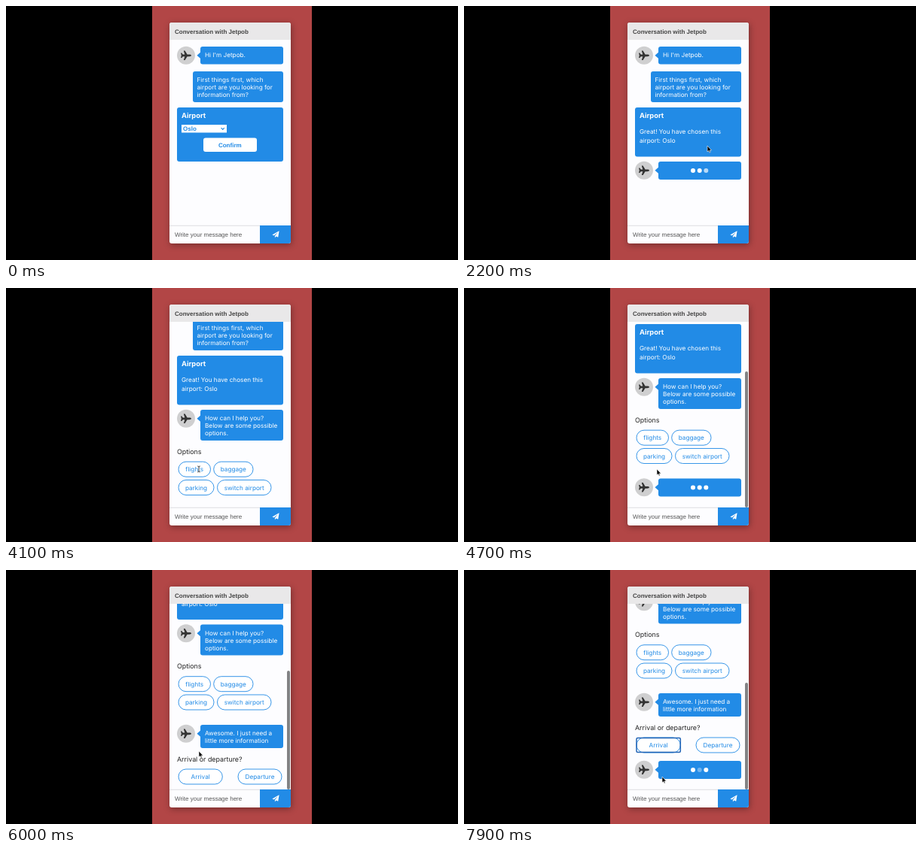
Animation of 600x338 px, one loop 8 s. Source, as an HTML page:

```html
<!DOCTYPE html>
<html lang="en">
<head>
<meta charset="utf-8">
<title>Airport chat</title>
<style>
  html, body { margin: 0; width: 100%; height: 100%; overflow: hidden; background: #000; }
  svg { display: block; width: 600px; height: 338px; text-rendering: geometricPrecision; }
  text { font-family: Inter, "Open Sans", sans-serif; font-size: 8.2px; fill: #fff; }
  .ui { font-family: "Liberation Sans", Arial, sans-serif; font-size: 8px; }
  .bold { font-weight: 700; }
  .title { font-size: 9.3px; font-weight: 700; }
  .label { font-size: 8.9px; fill: #222; }
  .blue { fill: #228be6; }
  .mid { text-anchor: middle; }
  .panel { filter: drop-shadow(1px 2px 4px rgba(0, 0, 0, .35)); }
</style>
</head>
<body>
<svg viewBox="0 0 600 338">
  <defs>
    <clipPath id="view"><rect x="217" y="45" width="161" height="247"/></clipPath>
    <path id="plane" d="M7 0C7-1 5.4-1.4 4.2-1.4H1.6L-1.4-6.2H-3.2L-1.7-1.4H-4.3L-5.7-3.2H-7L-6.2 0-7 3.2H-5.7L-4.3 1.4H-1.7L-3.2 6.2H-1.4L1.6 1.4H4.2C5.4 1.4 7 1 7 0Z"/>
  </defs>
  <rect width="600" height="338"/>
  <rect x="194" width="212" height="338" fill="#b24646"/>
  <rect class="panel" x="217" y="22" width="161" height="294" rx="3" fill="#fdfdff"/>
  <path d="M217 45V25a3 3 0 0 1 3-3H375a3 3 0 0 1 3 3V45Z" fill="#e9e8e9"/>
  <text class="ui bold" x="224" y="36.5" style="fill:#444">Conversation with Jetpob</text>
  <g clip-path="url(#view)"><g id="chat"></g></g>
  <rect id="bar" x="373" width="4" rx="2" fill="#828284"/>
  <path d="M217 292.3H337" stroke="#d2d2d4" stroke-width=".7"/>
  <text class="ui" x="224" y="307.2" style="fill:#555">Write your message here</text>
  <path d="M337 292H378V313a3 3 0 0 1-3 3H337Z" fill="#228be6"/>
  <path d="M362.6 299.2 353.4 304.4 355.7 305.4 361 301 356.9 306V308.6L358.4 306.6 361.2 307.7Z" fill="#fff"/>
  <g id="cursor">
    <path id="arrow" d="M0 0V8L1.8 6.4 2.9 9 4.2 8.4 3.1 5.9H5.5Z" stroke="#fff" stroke-width=".6"/>
    <g id="beam" fill="none">
      <path d="M-1.8-4Q0-4 0-2.8 0-4 1.8-4M0-3V3M-1.8 4Q0 4 0 2.8 0 4 1.8 4" stroke="#fff" stroke-width="1.8"/>
      <path d="M-1.8-4Q0-4 0-2.8 0-4 1.8-4M0-3V3M-1.8 4Q0 4 0 2.8 0 4 1.8 4" stroke="#333" stroke-width=".9"/>
    </g>
  </g>
</svg>
<script>
const LOOP = 8000, BLUE = '#228be6';
const $ = id => document.getElementById(id);

// Markup helpers; y is the middle of a text line or bubble row
const text = (x, y, s, cls = '') => `<text x="${x}" y="${y + 3}" class="${cls}">${s}</text>`;
const box = (x, y, w, h, fill = BLUE, r = 3) =>
  `<rect x="${x}" y="${y}" width="${w}" height="${h}" rx="${r}" fill="${fill}"/>`;
const lines = (x, y, rows, step = 10.1) => rows.map((s, i) => text(x, y + i * step, s)).join('');
const avatar = y => `<circle cx="239" cy="${y}" r="12" fill="#cfcfd0"/>
  <use href="#plane" x="239" y="${y}" fill="#333"/>
  <path d="M258.5 ${y - 4.5}L253.5 ${y}L258.5 ${y + 4.5}Z" fill="${BLUE}"/>`;
const reply = (top, h, rows) =>
  avatar(top + 11.8) + box(258, top, 110, h) + lines(264, top + 11, rows);
const chip = (x, y, w, s) =>
  `<rect x="${x}" y="${y - 10}" width="${w}" height="20" rx="10" fill="#fff" stroke="${BLUE}" stroke-width=".9"/>`
  + text(x + w / 2, y, s, 'blue mid');
const typing = top => avatar(top + 11.8) + box(258, top, 110, 24)
  + [304, 312.7, 321.3].map(x => `<circle class="dot" cx="${x}" cy="${top + 12}" r="3" fill="#fff"/>`).join('');

// Each part: from, to, markup
const parts = [
  [0, LOOP, reply(54, 23.5, ["Hi I'm Jetpob."])
    + box(248, 87, 120, 41)
    + lines(253.5, 98, ['First things first, which', 'airport are you looking for', 'information from?'])],
  [0, 1800, box(227, 135, 141, 72) + text(233, 146, 'Airport', 'title')
    + box(233, 158, 60, 10.5, '#fff', 0) + text(235, 163.2, 'Oslo', 'ui bold blue')
    + `<path d="M285.6 162.2L287.7 164.4 289.8 162.2" fill="none" stroke="${BLUE}" stroke-width="1.2"/>`
    + box(262, 175.5, 71, 18.5, '#fff') + text(297.3, 184.6, 'Confirm', 'ui bold blue mid')],
  [1800, LOOP, box(227, 135, 141, 65.5) + text(233, 146, 'Airport', 'title')
    + lines(233, 167, ['Great! You have chosen this', 'airport: Oslo'], 12.2)],
  [1900, 2700, typing(207)],
  [2700, LOOP, reply(207, 41, ['How can I help you?', 'Below are some possible', 'options.'])
    + text(227, 262.5, 'Options', 'label')
    + chip(229, 286.2, 42.5, 'flights') + chip(275.7, 286.2, 52.3, 'baggage')
    + chip(229, 310.5, 47, 'parking') + chip(280.5, 310.5, 71.5, 'switch airport')],
  [4500, 5500, typing(340.5)],
  [5500, LOOP, reply(340.5, 31, ['Awesome. I just need a', 'little more information'])
    + text(227, 386.5, 'Arrival or departure?', 'label')
    + chip(229, 409.5, 58.3, 'Arrival') + chip(308, 409.5, 58, 'Departure')],
  [7200, LOOP, `<rect x="229" y="400" width="58.3" height="19" rx="1.5" fill="none" stroke="#2163b5" stroke-width="1.5"/>`
    + typing(430.5)]
];
$('chat').innerHTML = parts.map(p => `<g>${p[2]}</g>`).join('');
const groups = [...$('chat').children];
const dots = [...document.querySelectorAll('.dot')];

// time, scroll offset, scrollbar top, time the bar starts to fade
const scrolls = [[0, 0, 292, 0], [2700, 45, 85, 3500], [4500, 87, 111, 5500],
  [5500, 134.5, 134, 6400], [7200, 176.5, 150, 8000]];

// time, x, y of the pointer
const path = [[1000, 298, 167], [1400, 323, 186], [2700, 323, 186], [2900, 322, 187],
  [3100, 322, 187], [4000, 256, 241], [6400, 256, 241], [7000, 263, 275], [8000, 263, 275]];

const clamp = v => Math.min(1, Math.max(0, v));
const ease = v => v * v * (3 - 2 * v);

function pointer(t) {
  const i = Math.max(1, path.findIndex(p => p[0] > t));
  const [a, b] = [path[i - 1], path[i]];
  const k = ease(clamp((t - a[0]) / (b[0] - a[0])));
  return [a[1] + (b[1] - a[1]) * k, a[2] + (b[2] - a[2]) * k];
}

function render(t) {
  groups.forEach((g, i) => {
    g.style.display = t >= parts[i][0] && t < parts[i][1] ? '' : 'none';
  });
  const [, offset, top, fade] = scrolls.filter(s => s[0] <= t).pop();
  $('chat').setAttribute('transform', `translate(0 ${-offset})`);
  $('bar').setAttribute('y', top);
  $('bar').setAttribute('height', 292 - top);
  $('bar').style.opacity = 1 - clamp((t - fade) / 250);

  // Dots dim one after another
  dots.forEach((d, i) => {
    const phase = (t - 5300 - (i % 3) * 200 + 600 + 12000) % 1200 - 600;
    d.style.opacity = 1 - .65 * clamp(1 - Math.abs(phase) / 200);
  });

  const [x, y] = pointer(t);
  const overText = t >= 2700 && t < 4500 && (y < 200 || y > 233);
  $('cursor').setAttribute('transform', `translate(${x} ${y})`);
  $('cursor').style.display = t < 1000 ? 'none' : '';
  $('beam').style.display = overText ? '' : 'none';
  $('arrow').style.display = overText ? 'none' : '';
}

const start = performance.now();
function tick() {
  render((performance.now() - start) % LOOP);
  requestAnimationFrame(tick);
}
tick();
</script>
</body>
</html>
```
